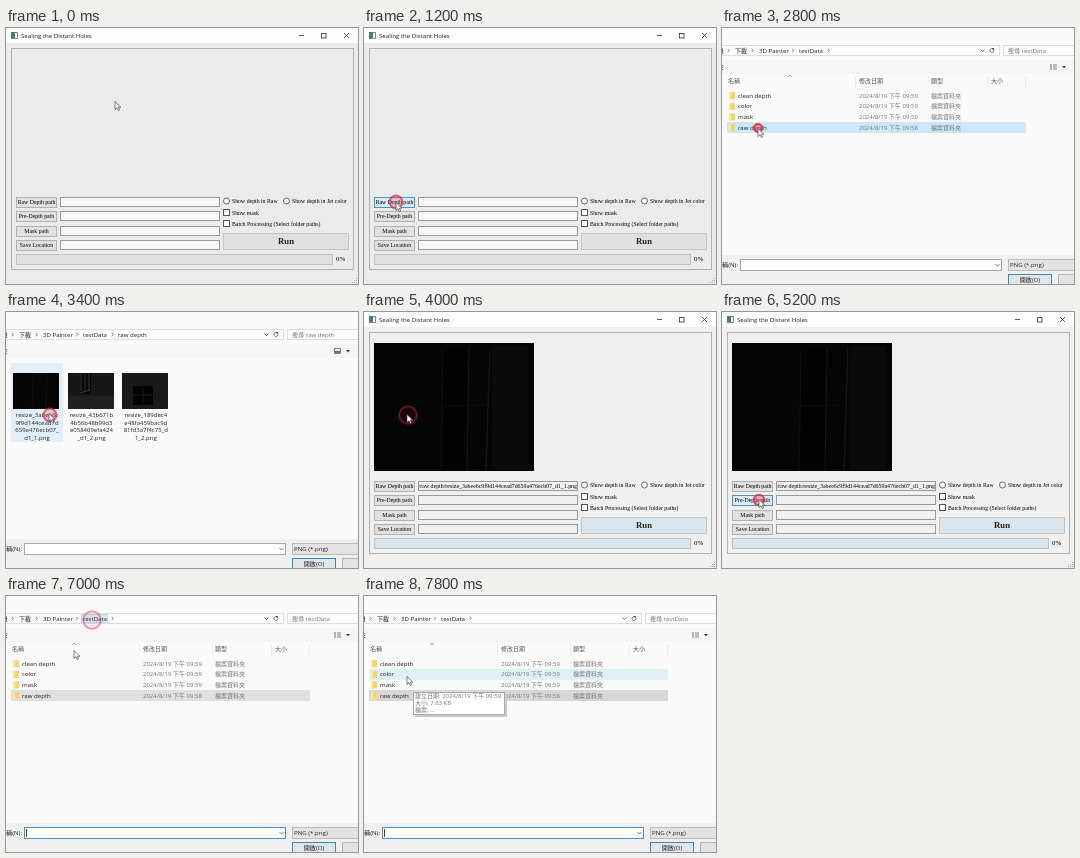
Animation of 352 by 256 pixels, one loop 8000 ms. Source, as an HTML page with a canvas:

```html
<!DOCTYPE html>
<html lang="zh-Hant">
<head>
<meta charset="utf-8">
<style>
html, body { margin: 0; width: 100%; height: 100%; overflow: hidden; background: #fafafa; }
canvas { display: block; }
</style>
</head>
<body>
<canvas id="stage" width="352" height="256"></canvas>
<script>
const ctx = document.getElementById('stage').getContext('2d');
const LOOP = 8000, STEP = 200;
const SANS = '"Open Sans", "Noto Sans CJK TC", "Noto Sans CJK", sans-serif';
const SERIF = '"Liberation Serif", serif';
const ARROW = new Path2D('M0 0V8L2 6.2L3.3 9L4.6 8.4L3.4 5.7H5.8Z');

// [time, x, y] of the pointer tip
const POINTER = [
  [0, 109, 73], [200, 109, 73], [1000, 32, 174], [1400, 32, 174], [2000, 54, 81],
  [2400, 54, 81], [2800, 36, 100], [3000, 36, 100], [3400, 43, 101], [4000, 43, 102],
  [4800, 37, 187], [5200, 37, 187], [5600, 59, 137], [6400, 88, 24],
  [6600, 86, 24], [7000, 68, 54], [7400, 48, 77], [7800, 43, 80]
];
const CLICKS = [[1000, 32, 174], [2200, 54, 81], [2800, 36, 100], [3200, 44, 103],
  [3600, 44, 103], [5100, 37, 188], [6600, 86, 24]];
const FILES = [
  ['resize_3abee6c', '9f9d144cead7d', '659a476ecb07_', 'd1_1.png'],
  ['resize_43b671b', '4b56b48b99d3', 'e058409efa424', '_d1_2.png'],
  ['resize_189dec4', 'e48fa459bac9d', '81fd3a7f4c75_d', '1_2.png']
];

function fill(x, y, w, h, color) {
  ctx.fillStyle = color;
  ctx.fillRect(x, y, w, h);
}

function box(x, y, w, h, color, border) {
  fill(x, y, w, h, color);
  ctx.strokeStyle = border;
  ctx.lineWidth = 1;
  ctx.strokeRect(x + .5, y + .5, w - 1, h - 1);
}

function line(points, color = '#555', width = .8) {
  ctx.beginPath();
  points.forEach(([x, y]) => ctx.lineTo(x, y));
  ctx.strokeStyle = color;
  ctx.lineWidth = width;
  ctx.stroke();
}

// y is the visual middle of the line
function text(value, x, y, { color = '#222', size = 6.1, family = SANS, align = 'left', weight = '' } = {}) {
  ctx.font = `${weight} ${size}px ${family}`;
  ctx.textAlign = align;
  ctx.fillStyle = color;
  ctx.fillText(value, x, y + size * .35);
}

const serif = (value, x, y, options) => text(value, x, y, { size: 5.8, family: SERIF, color: '#000', ...options });
const chevron = (x, y, dx, dy, color) =>
  line(dx ? [[x - dx, y - 1.6], [x + dx, y], [x - dx, y + 1.6]] : [[x - 2, y - dy], [x, y + dy], [x + 2, y - dy]], color);

function depthImage() {
  fill(10, 31, 160, 128, '#050505');
  fill(79, 38, 24, 121, '#020202');
  fill(128, 34, 36, 123, '#0b0b0b');
  line([[79, 38], [77, 158]], '#0e0e0e', 1);
  line([[105, 37], [103, 158]], '#151515', 1);
  line([[126, 36], [122, 158]], '#151515', 1.5);
  line([[80, 94], [124, 93]], '#0e0e0e', 1);
}

function appWindow(t) {
  const later = t >= 4000;
  const face = later ? '#f0f0f0' : '#ebebeb';
  fill(0, 0, 352, 256, face);
  fill(0, 0, 352, 15, '#fdfdfd');
  box(5, 4, 7, 7, '#f4f4f4', '#888');
  fill(5, 4, 4, 6, '#477b78');
  text('Sealing the Distant Holes', 15, 7.5);
  line([[293, 7.5], [298, 7.5]], '#333');
  ctx.strokeRect(315.5, 5.5, 4.5, 4.5);
  line([[338, 5], [343, 10]], '#333');
  line([[343, 5], [338, 10]], '#333');
  box(5, 20, 343, 222, face, '#b0b0b0');
  if (later) depthImage();

  ['Raw Depth path', 'Pre-Depth path', 'Mask path', 'Save Location'].forEach((label, i) => {
    const y = Math.round(169 + i * 14.4);
    const active = i === 0 ? t >= 800 && t < 1400 : i === 1 && t >= 4800;
    box(10, y, 41, 11, active ? '#d9ebf5' : '#e1e1e1', active ? '#4796c8' : '#b0b0b0');
    serif(label, 30.5, y + 5.1, { align: 'center' });
    box(54, y, 160, 10, later ? '#eff1f1' : '#f7f7f7', '#999');
  });
  if (later) {
    ctx.save();
    ctx.beginPath();
    ctx.rect(55, 170, 158, 8);
    ctx.clip();
    serif('/raw depth/' + FILES[0].join(''), 213, 174, { align: 'right', size: 5.9 });
    ctx.restore();
  }

  [[220.5, 'Show depth in Raw'], [280.5, 'Show depth in Jet color']].forEach(([x, label]) => {
    ctx.beginPath();
    ctx.arc(x, 173, 3, 0, 7);
    ctx.fillStyle = '#fff';
    ctx.fill();
    ctx.strokeStyle = '#444';
    ctx.lineWidth = .8;
    ctx.stroke();
    serif(label, x + 5.5, 173);
  });
  [[181, 'Show mask'], [192, 'Batch Processing (Select folder paths)']].forEach(([y, label]) => {
    box(217, y, 7, 7, '#fff', '#555');
    serif(label, 226, y + 3.5);
  });
  const tint = later ? '#d9e6ed' : '#e0e0e0';
  box(217, 205, 126, 17, tint, '#c4c4c4');
  serif('Run', 280, 212.7, { size: 8.7, weight: 'bold', align: 'center', color: '#222' });
  box(10, 226, 317, 11, tint, '#c0c0c0');
  serif('0%', 330, 231, { size: 6.8 });
  for (let i = 0; i < 3; i++)
    for (let j = 0; j <= i; j++) fill(350 - j * 2, 250 + i * 2, 1, 1, '#aaa');
}

function thumbnail(x, kind) {
  fill(x, 61, 46, 36, '#050505');
  if (kind === 0) {
    line([[x + 20, 62], [x + 19, 96]], '#101010');
    line([[x + 34, 63], [x + 33, 96]], '#141414');
  } else if (kind === 1) {
    fill(x, 61, 46, 36, '#171717');
    fill(x + 12, 62, 11, 20, '#080808');
    for (let i = 0; i < 3; i++) line([[x + 13 + i * 4, 62], [x + 13 + i * 4, 79]], '#444');
    line([[x + 12, 81], [x + 22, 78]], '#444');
    fill(x, 84, 46, 13, '#202020');
  } else {
    fill(x, 61, 46, 36, '#191919');
    fill(x + 11, 74, 20, 19, '#030303');
    line([[x + 21, 75], [x + 21, 93]], '#202020');
    line([[x + 11, 83], [x + 31, 83]], '#202020');
  }
}

function fileGrid(t) {
  if (t >= 3200 && t <= 4000) fill(5, 51, 52, 79, t > 3400 ? '#cce8f8' : '#e2eff8');
  FILES.forEach((name, i) => {
    thumbnail(Math.round(7.4 + i * 54.4), i);
    name.forEach((part, row) => text(part, 31 + i * 54.4, 103 + row * 7.5, { align: 'center', size: 6 }));
  });
}

function folderList(rows, marks) {
  const gray = { color: '#555', size: 6 };
  [['名稱', 6], ['修改日期', 137], ['類型', 209], ['大小', 269]].forEach(([label, x]) => text(label, x, 53, gray));
  [133, 206, 265, 303].forEach(x => fill(x, 48, 1, 11, '#ececec'));
  chevron(68, 48, 0, -.8, '#888');
  rows.forEach(([name, time], i) => {
    const y = 67.7 + i * 10.6;
    if (marks[i]) fill(5, Math.round(y - 5.2), 299, 11, marks[i]);
    fill(7, y - 3.5, 6, 7, '#f6d36b');
    fill(7, y - 3.5, 2, 7, '#ffe79b');
    text(name, 16, y);
    text(`2024/8/19 下午 ${time}`, 137, y, { color: '#777', size: 6 });
    text('檔案資料夾', 209, y, { color: '#777', size: 6 });
  });
}

function tooltip() {
  fill(51, 98, 92, 23, '#c9c9c9');
  box(49, 96, 92, 23, '#fff', '#aaa');
  ['建立日期: 2024/8/19 下午 09:59', '大小: 7.63 KB', '檔案: ...'].forEach((label, i) =>
    text(label, 51, 100.3 + i * 7, { color: '#777', size: 6 }));
}

function viewIcon(asPictures) {
  if (asPictures) {
    box(328, 36, 7, 6, '#dcebf2', '#888');
    fill(329, 39, 5, 2, '#4f7793');
    return;
  }
  for (let i = 0; i < 3; i++) {
    fill(328, 36.5 + i * 2, 2, 1, '#4f7793');
    fill(331, 36.5 + i * 2, 4, 1, '#888');
  }
}

function dialog(t) {
  const place = t < 2600 ? 0 : t < 3000 || t >= 6800 ? 1 : 2;
  const crumbs = [['下載', 13, 30.5], ['3D Painter', 37, 71], ['testData', 77, 106.5], ['raw depth', 112, 0]];
  fill(0, 0, 352, 256, '#fafafa');
  box(-2, 17, 280, 11, '#fcfcfc', '#dedede');
  box(281, 17, 80, 11, '#fcfcfc', '#dedede');
  if (t >= 6400 && t <= 7000) box(75, 18, 27, 9, '#d9edf8', '#b9dced');
  text('機', -4.5, 22.5);
  chevron(6.5, 22.5, .8, 0);
  crumbs.slice(0, place + 2).forEach(([label, x, arrow]) => {
    text(label, x, 22.5);
    if (arrow) chevron(arrow, 22.5, .8, 0);
  });
  chevron(260.5, 22.5, 0, 1);
  ctx.beginPath();
  ctx.arc(270, 22.5, 2, -.6, 4.6);
  ctx.stroke();
  fill(270, 20, 2, 1.5, '#555');
  text('搜尋 ' + crumbs[place + 1][0], 286, 22.5, { color: '#777' });

  fill(0, 32, 352, 14, '#f5f5f5');
  text('夾', -4.5, 39);
  viewIcon(place === 2);
  ctx.fillStyle = '#444';
  ctx.beginPath();
  ctx.moveTo(340, 38);
  ctx.lineTo(344, 38);
  ctx.lineTo(342, 40.5);
  ctx.fill();

  if (place === 0) {
    folderList([['_internal', '09:47'], ['testData', '10:55']],
      [0, t >= 2200 ? '#cce8f8' : t >= 2000 ? '#e3f1f8' : 0]);
  } else if (place === 1) {
    const onColor = t >= 7400;
    const last = t < 3000 ? (t >= 2800 ? '#cce8f8' : 0) : onColor ? '#d7d7d7' : '#e1dfdf';
    folderList([['clean depth', '09:59'], ['color', '09:59'], ['mask', '09:59'], ['raw depth', '09:58']],
      [0, onColor ? '#dff0f9' : 0, 0, last]);
    if (t >= 7800) tooltip();
  } else {
    fileGrid(t);
  }

  fill(0, 227, 352, 29, '#f0f0f0');
  const fileFocus = t < 2800 || t >= 5400;
  text('檔案名稱(N):', 16, 237, { align: 'right' });
  box(18, 231, 262, 12, '#fff', fileFocus ? '#4b93bd' : '#aaa');
  if (t >= 3600 && t <= 4000) text(FILES[0].join(''), 20, 237);
  if (t >= 5400) fill(20, 233, 1, 8, '#444');
  chevron(275.5, 237, 0, 1);
  box(286, 231, 80, 12, '#e3e3e3', '#bbb');
  text('PNG (*.png)', 288, 237);
  box(286, 246, 44, 14, '#e1e6e9', '#3b87b5');
  text('開啟(O)', 308, 251.5, { align: 'center' });
  box(336, 246, 30, 14, '#e3e3e3', '#b5b5b5');
}

function ripple(t) {
  CLICKS.forEach(([start, x, y]) => {
    const age = (t - start) / 500;
    if (age < 0 || age >= 1) return;
    ctx.beginPath();
    ctx.arc(x, y, 4 + 6 * age, 0, 7);
    ctx.fillStyle = `rgba(235, 70, 85, ${.45 * (1 - age)})`;
    ctx.fill();
    ctx.strokeStyle = `rgba(220, 40, 60, ${.9 - .6 * age})`;
    ctx.lineWidth = 2;
    ctx.stroke();
  });
}

function pointer(t) {
  const next = POINTER.findIndex(key => key[0] > t);
  const b = next < 0 ? POINTER.at(-1) : POINTER[next];
  const a = next < 0 ? b : POINTER[next - 1];
  const part = b === a ? 0 : (t - a[0]) / (b[0] - a[0]);
  ctx.save();
  ctx.translate(a[1] + (b[1] - a[1]) * part, a[2] + (b[2] - a[2]) * part + .5);
  ctx.fillStyle = '#fff';
  ctx.strokeStyle = '#444';
  ctx.lineWidth = .7;
  ctx.fill(ARROW);
  ctx.stroke(ARROW);
  ctx.restore();
}

function draw() {
  const t = Math.floor(performance.now() % LOOP / STEP) * STEP;
  const inDialog = (t >= 1400 && t < 4000) || t >= 5400;
  (inDialog ? dialog : appWindow)(t);
  ripple(t);
  pointer(t);
  requestAnimationFrame(draw);
}
draw();
</script>
</body>
</html>
```
